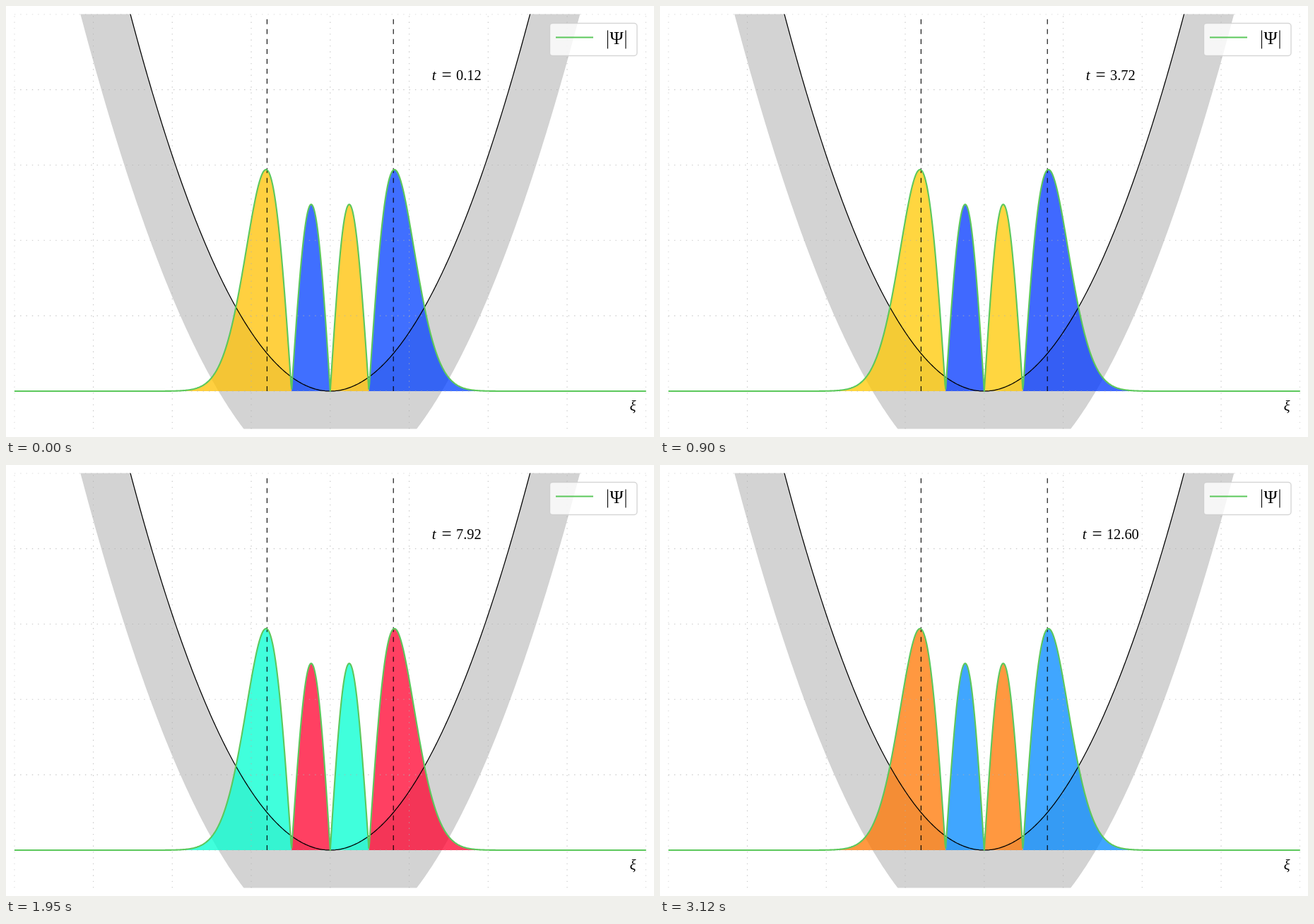
Animation of 917 by 611 pixels, one loop 3150 ms. Source, as an HTML page:

```html
<!DOCTYPE html>
<html lang="en">
<head>
<meta charset="utf-8">
<title>Oscillator eigenstate</title>
<style>
  html, body { margin: 0; width: 100%; height: 100%; overflow: hidden; background: #fff; }
  svg { display: block; width: 917px; height: 611px; }
  text { font-family: "Liberation Serif", "Times New Roman", serif; fill: #000; }
  .italic { font-style: italic; }
</style>
</head>
<body>
<svg id="stage" viewBox="0 0 917 611" fill="none">
  <defs>
    <clipPath id="plot"><rect x="11.5" y="11.5" width="894.5" height="588"/></clipPath>
  </defs>
  <g clip-path="url(#plot)">
    <path id="band" fill="#d3d3d3"/>
    <path id="odd" fill-opacity=".75"/>
    <path id="even" fill-opacity=".75"/>
    <path id="grid" stroke="#b0b0b0" stroke-opacity=".7" stroke-width="1.1" stroke-dasharray="1.4 6.94"/>
    <path id="well" stroke="#000" stroke-width="1.25"/>
    <path id="turning" stroke="#000" stroke-width="1.1" stroke-dasharray="7.03 7.03"/>
    <path id="wave" stroke="#5cc85c" stroke-width="2.1" stroke-linejoin="round"/>
  </g>
  <rect x="769.5" y="24.5" width="123.5" height="46" rx="4" fill="#fff" fill-opacity=".8" stroke="#ccc" stroke-opacity=".8" stroke-width="1.4"/>
  <path d="M778 44.5H831" stroke="#5cc85c" stroke-width="2.1"/>
  <path d="M851.5 34.5V60.5M877 34.5V60.5" stroke="#000" stroke-width="1.1"/>
  <text x="864.2" y="54" font-size="26" text-anchor="middle">Ψ</text>
  <text class="italic" x="887" y="574" font-size="20.4" text-anchor="middle">ξ</text>
  <text id="tName" class="italic" y="104.5" font-size="21">t</text>
  <text id="tEquals" y="105.5" font-size="25">=</text>
  <text id="tValue" y="104.5" font-size="20.4"></text>
</svg>
<script>
const el = id => document.getElementById(id);
const CX = 458.8, BASE = 546, UNIT = 44.7, HEIGHT = 534.2, ENERGY = 3.5;
const STEP_MS = 30, STEPS = 105, DT = 0.12;

const px = x => CX + x * UNIT;
const py = v => BASE - v * HEIGHT / 20;
const psi = x => 4 * (2 * x ** 3 - 3 * x) * Math.exp(-x * x / 2) / (Math.PI ** 0.25 * Math.sqrt(48));

// Polyline of f over [a, b], without the leading move command
function curve(f, a, b, n = 400) {
  const points = [];
  for (let i = 0; i <= n; i++) {
    const x = a + (b - a) * i / n;
    points.push(px(x).toFixed(2) + ' ' + py(f(x)).toFixed(2));
  }
  return points.join('L');
}
const lobe = (a, b) => `M${px(a)} ${BASE}L${curve(x => 20 * Math.abs(psi(x)), a, b, 160)}L${px(b)} ${BASE}Z`;
const draw = (id, d) => el(id).setAttribute('d', d);

function drawPlot() {
  const well = x => x * x / 2;
  const outer = x => 0.4 * x * x - 5;
  const node = Math.sqrt(1.5);
  draw('band', `M${curve(outer, -8, 8)}L${curve(well, 8, -8)}Z`);
  draw('well', 'M' + curve(well, -6.5, 6.5));
  draw('wave', 'M' + curve(x => 20 * Math.abs(psi(x)), -10, 10, 1000));
  draw('odd', lobe(-4.7, -node) + lobe(0, node));
  draw('even', lobe(-node, 0) + lobe(node, 4.7));
  draw('turning', [-2, 2].map(x => `M${px(x)} ${BASE}V12`).join(''));

  let grid = '';
  for (let x = -10; x <= 10; x += 2.5) grid += `M${px(x)} 599.4V12`;
  for (let v = 0; v <= 20; v += 4) grid += `M${px(-10)} ${py(v)}H${px(10)}`;
  draw('grid', grid);
}

function render(ms) {
  const step = Math.floor(ms / STEP_MS) % STEPS;
  const t = (step + 1) * DT;
  const hue = (ENERGY * t * 180 / Math.PI + 201) % 360;
  el('even').setAttribute('fill', `hsl(${hue}, 100%, 50%)`);
  el('odd').setAttribute('fill', `hsl(${(hue + 180) % 360}, 100%, 50%)`);

  const label = t.toFixed(2);
  const left = 637.8 - (label.length > 4 ? 80.2 : 70.1) / 2;
  el('tName').setAttribute('x', left);
  el('tEquals').setAttribute('x', left + 13.7);
  el('tValue').setAttribute('x', left + 34.2);
  el('tValue').textContent = label;
}

drawPlot();
const start = performance.now();
function tick() {
  render(performance.now() - start);
  requestAnimationFrame(tick);
}
tick();
</script>
</body>
</html>
```
